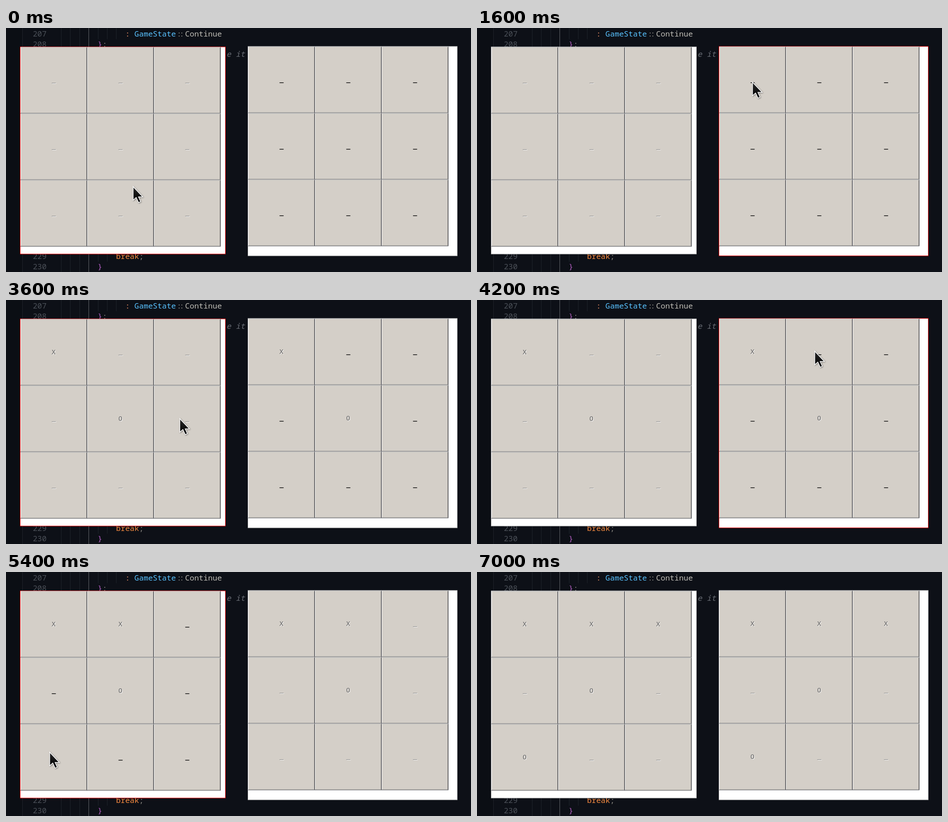
An HTML page with a canvas that plays this animation: 1031 px wide and 543 px high, repeating every 8000 ms.

```html
<!DOCTYPE html>
<html lang="en">
<head>
<meta charset="utf-8">
<title>Tic-tac-toe in two windows</title>
<style>
  html, body { margin: 0; width: 100%; height: 100%; overflow: hidden; background: #0d1017; }
  canvas { display: block; width: 1031px; height: 543px; }
</style>
</head>
<body>
<canvas id="stage" width="1031" height="543"></canvas>
<script>
const ctx = document.getElementById("stage").getContext("2d");
const LOOP = 8000, STEP = 100, CELL = 148, PRESS = 100, POINTER_END = 7000;
const FACE = "#d4cfc8";

const LEFT = { x: 31, y: 41.5, w: 456, h: 462 };
const RIGHT = { x: 536, y: 40.5, w: 465, h: 467 };

// Key points of the pointer: time, x, y; equal neighbours are rests
const PATH = [
  [200, 281, 351], [700, 414, 184.5], [1400, 610, 118.5],
  [2500, 610, 118.5], [3100, 262, 268],
  [3300, 262, 268], [3600, 384.5, 262], [4100, 748, 112],
  [4400, 748, 112], [4800, -19, 359], [5200, 96, 399],
  [5600, 96, 399], [6100, 839.5, 145.5], [6400, 876, 116]
];

// Players alternate: X in the right window, O in the left one
const MOVES = [[2300, 0], [3300, 4], [4400, 1], [5600, 6], [6500, 2]]
  .map(([time, cell], i) => ({ time, cell, mark: "XO"[i % 2], win: i % 2 ? LEFT : RIGHT }));
const GAME_OVER = MOVES[MOVES.length - 1].time;

function rect(color, x, y, w, h) {
  ctx.fillStyle = color;
  ctx.fillRect(x, y, w, h);
}

// Writes code on a numbered line at a column of the monospaced grid
function code(str, line, col, color, style = "") {
  ctx.font = `${style} 17px "Noto Sans Mono", monospace`;
  ctx.fillStyle = color;
  ctx.fillText(str, 59.4 + col * 10.2, 19 + (line - 207) * 22.5);
}

function drawEditor() {
  const dim = "#8a8983", brace = "#b45fc4", number = "#4b5058";
  rect("#0d1017", 0, 0, 1031, 543);
  rect("#0b0e14", 0, 0, 36, 543);
  rect("#1f232a", 36, 0, 1, 543);
  for (let i = 0; i < 7; i++) {
    const x = Math.round(122 + i * 20.4);
    if (i < 4) rect(i === 3 ? "#64676d" : "#1f232a", x, 0, 1, 543);
    else rect("#1f232a", x, 0, 1, 25);
    if (i === 4 || i === 5) rect("#1f232a", x, 500, 1, 20);
  }
  for (const n of [207, 208, 229, 230]) code(n, n, 0, number);
  code(":", 207, 20.1, "#f29668");
  code("GameState", 207, 22.1, "#59c2ff");
  code(":", 207, 31.3, dim);
  code(":", 207, 31.9, dim);
  code("Continue", 207, 33.1, "#bfbdb6");
  code("}", 208, 14.1, brace);
  code(";", 208, 15.1, dim);
  code("e it", 209, 42.1, "#686c74", "italic");
  code("break", 229, 18.1, "#f58a40");
  code(";", 229, 23.1, dim);
  code("}", 230, 14.1, brace);
}

function drawMark(mark, x, y, enabled) {
  const paint = (color, d) => {
    ctx.fillStyle = color;
    if (mark) ctx.fillText(mark, x + 73.5 + d, y + 78 + d);
    else ctx.fillRect(x + 69.5 + d, y + 79.5 + d, 9, enabled ? 1.4 : 1);
  };
  ctx.font = '14.5px "DejaVu Sans Mono", monospace';
  ctx.textAlign = "center";
  if (mark || !enabled) {
    paint("#fff", 1);
    paint(mark ? "#606060" : "#808080", 0);
  } else {
    paint("#000", 0);
  }
  ctx.textAlign = "left";
}

function drawButton(x, y, mark, enabled, pressed) {
  const layers = pressed ? ["#404040", "#808080"] : ["#fff", FACE];
  const edges = pressed ? layers : ["#404046", "#8a8885"];
  for (let i = 0; i < 2; i++) {
    const size = CELL - 2 * i;
    rect(edges[i], x + i, y + i, size, size);
    rect(layers[i], x + i, y + i, size - 1, size - 1);
  }
  rect(FACE, x + 2, y + 2, CELL - 4, CELL - 4);
  const shift = pressed ? 1 : 0;
  drawMark(mark, x + shift, y + shift, enabled);
}

function drawWindow(win, t, marks, turn, focus) {
  rect(focus === win ? "#f00" : "#bebebe", win.x, win.y, win.w, win.h);
  rect("#fff", win.x + 1, win.y + 1, win.w - 2, win.h - 2);
  const down = MOVES.find(m => m.win === win && t >= m.time - PRESS && t < m.time);
  for (let i = 0; i < 9; i++) {
    const x = win.x + 1 + (i % 3) * CELL;
    const y = win.y + 1 + Math.floor(i / 3) * CELL;
    drawButton(x, y, marks[i], turn === win, down && down.cell === i);
  }
}

// Smooth curve through the key points that never overshoots them
function along(t, axis) {
  const last = PATH.length - 1;
  const slope = i => i < 0 || i >= last ? 0
    : (PATH[i + 1][axis] - PATH[i][axis]) / (PATH[i + 1][0] - PATH[i][0]);
  const tangent = i => {
    const a = slope(i - 1), b = slope(i);
    return a * b > 0 ? 2 * a * b / (a + b) : 0;
  };
  let i = 0;
  while (i < last - 1 && PATH[i + 1][0] <= t) i++;
  const span = PATH[i + 1][0] - PATH[i][0];
  const k = Math.min(1, Math.max(0, (t - PATH[i][0]) / span));
  const ease = k * k * (3 - 2 * k);
  return PATH[i][axis] * (1 - ease) + PATH[i + 1][axis] * ease
    + span * k * (1 - k) * ((1 - k) * tangent(i) - k * tangent(i + 1));
}

// Focus follows the pointer and stays while it is outside both windows
function focusAt(t) {
  if (t >= GAME_OVER) return null;
  for (let s = t; s >= 0; s -= STEP) {
    const x = along(s, 1);
    const hit = [LEFT, RIGHT].find(w => x >= w.x && x < w.x + w.w);
    if (hit) return hit;
  }
  return LEFT;
}

const arrow = new Path2D("M1.6 3.9V30.5L7.9 25L13.3 36.5L16.6 35L11.7 24H20.5Z");

function drawPointer(x, y) {
  ctx.save();
  ctx.translate(x, y);
  ctx.save();
  ctx.shadowColor = "rgba(0,0,0,.45)";
  ctx.shadowBlur = 3;
  ctx.shadowOffsetX = ctx.shadowOffsetY = 1;
  ctx.strokeStyle = "#fff";
  ctx.lineWidth = 3;
  ctx.stroke(arrow);
  ctx.restore();
  const shade = ctx.createLinearGradient(0, 4, 0, 36);
  shade.addColorStop(0, "#262626");
  shade.addColorStop(1, "#000");
  ctx.fillStyle = shade;
  ctx.fill(arrow);
  ctx.restore();
}

function draw(t) {
  const marks = Array(9).fill("");
  const done = MOVES.filter(m => t >= m.time);
  for (const m of done) marks[m.cell] = m.mark;
  const next = MOVES[done.length];
  const turn = next ? next.win : null;
  const focus = focusAt(t);

  drawEditor();
  drawWindow(LEFT, t, marks, turn, focus);
  drawWindow(RIGHT, t, marks, turn, focus);
  if (t < POINTER_END) drawPointer(along(t, 1), along(t, 2));
}

const start = performance.now();
function tick() {
  const t = (performance.now() - start) % LOOP;
  draw(Math.floor(t / STEP) * STEP);
  requestAnimationFrame(tick);
}
tick();
</script>
</body>
</html>
```
